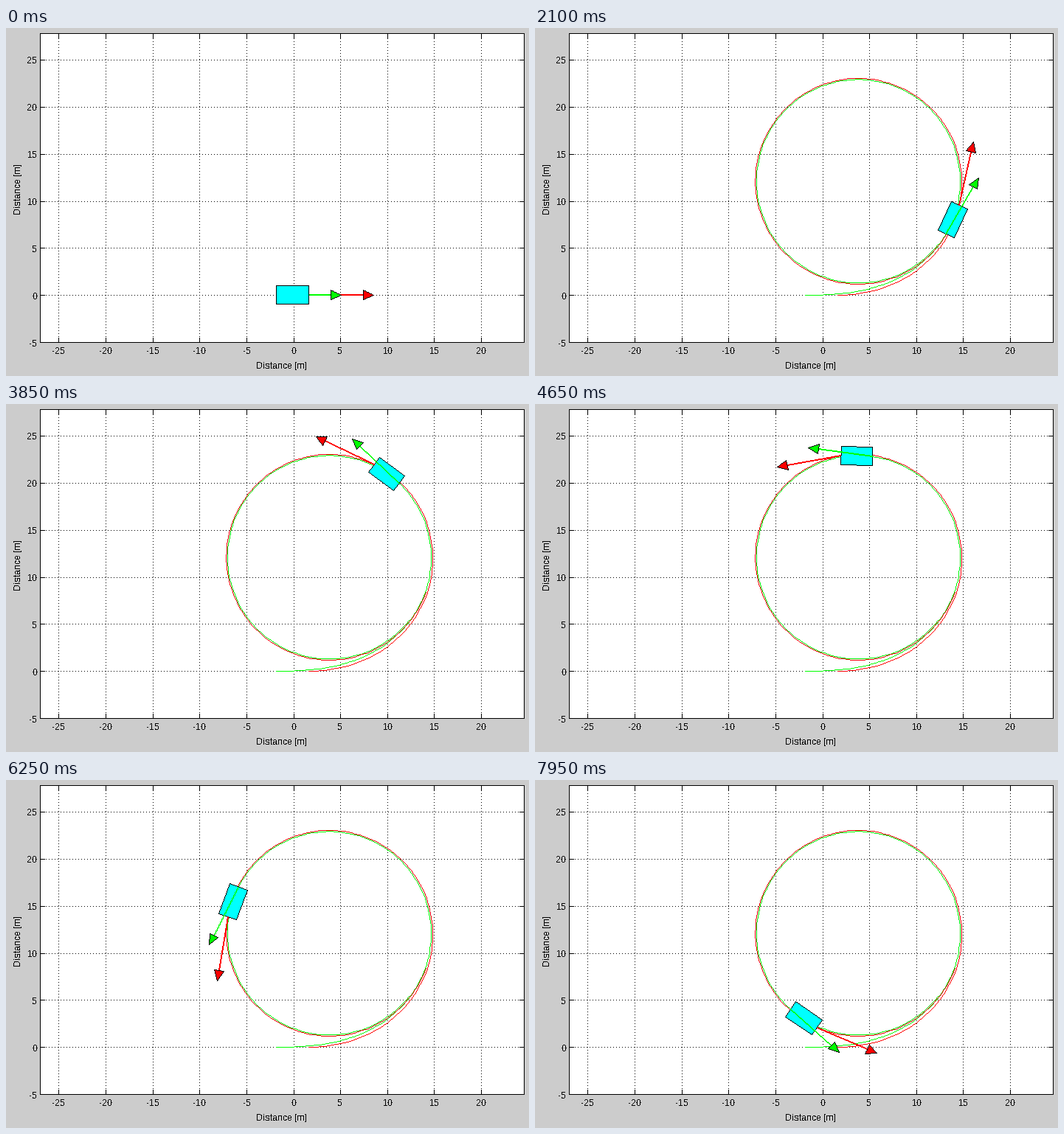
A matplotlib script for the animation above (8 s loop, 709x472 px).

```python
import numpy as np
import matplotlib.pyplot as plt
from matplotlib.animation import FuncAnimation
from matplotlib.patches import PathPatch, Polygon, Rectangle
from matplotlib.path import Path

W, H, DPI = 709, 472, 100
PX = 72 / DPI                       # one pixel in points
FRAMES, STEP_MS = 160, 50
TRAIL_STEPS = 200

LEFT, RIGHT, TOP, BOTTOM = 46, 702, 7, 426
CENTRE = np.array([437.8, 207.4])   # centre of the steady turn
HALF_WIDTH = 12.5
ARROW, HEAD, HEAD_HALF = 88, 14, 6.5
GREEN, RED, CYAN = "#00ff00", "#ff0000", "#00ffff"
SQUARE = np.array([[-1, -1], [1, -1], [1, 1], [-1, 1], [-1, -1]]) / 2
SQUARE_CODES = [Path.MOVETO] + [Path.LINETO] * 3 + [Path.CLOSEPOLY]

plt.rcParams.update({
    "font.family": "Liberation Sans",
    "font.size": 12 * PX,
    "text.antialiased": False,
    "text.hinting": "native",
    "text.hinting_factor": 1,
})

# Data coordinates are pixel indices: whole numbers are pixel centres.
fig = plt.figure(figsize=(W / DPI, H / DPI), dpi=DPI, facecolor="#cccccc")
ax = fig.add_axes([0, 0, 1, 1])
ax.set_xlim(-0.5, W - 0.5)
ax.set_ylim(H - 0.5, -0.5)
ax.axis("off")


def raster(points):
    """Pixels of a hard-edged, one pixel wide line through the points."""
    parts = []
    for p, q in zip(points[:-1], points[1:]):
        a, b = np.rint(p), np.rint(q)
        n = int(max(abs(b - a))) + 1
        parts.append(np.rint(np.linspace(a, b, n)))
    return np.concatenate(parts)


def pixel_path(pixels):
    verts = (pixels[:, None, :] + SQUARE).reshape(-1, 2)
    return Path(verts, SQUARE_CODES * len(pixels))


class Stroke:
    def __init__(self, color, z, pixels=np.zeros((1, 2))):
        self.patch = PathPatch(pixel_path(pixels), fc=color, ec="none",
                               lw=0, zorder=z, snap=False)
        ax.add_patch(self.patch)

    def set(self, pixels):
        self.patch.set_path(pixel_path(pixels))


class Shape:
    """Filled polygon with a thin black outline."""

    def __init__(self, color, z):
        self.fill = Polygon(np.zeros((3, 2)), fc=color, ec="none", lw=0,
                            zorder=z, snap=False)
        ax.add_patch(self.fill)
        self.edge = Stroke("black", z + 0.1)

    def set(self, corners):
        self.fill.set_xy(corners)
        self.edge.set(raster([*corners, corners[0]]))

    def set_zorder(self, z):
        self.fill.set_zorder(z)
        self.edge.patch.set_zorder(z + 0.1)


def rule(x0, y0, x1, y1, every=1, z=2):
    pixels = raster([np.array([x0, y0]), np.array([x1, y1])])
    Stroke("black", z, pixels[::every])


def x_pixel(v):
    return round(389.55 + 12.727 * v)


def y_pixel(v):
    return round(362.2 - 12.767 * v)


def draw_axes():
    ax.add_patch(Rectangle((LEFT, TOP), RIGHT - LEFT, BOTTOM - TOP,
                           fc="white", ec="none", lw=0, zorder=0, snap=False))
    for x in (LEFT, RIGHT):
        rule(x, TOP, x, BOTTOM)
    for y in (TOP, BOTTOM):
        rule(LEFT, y, RIGHT, y)
    for v in range(-25, 21, 5):
        x = x_pixel(v)
        rule(x, BOTTOM, x, TOP, every=4, z=1)
        rule(x, BOTTOM, x, BOTTOM - 6)
        rule(x, TOP, x, TOP + 6)
        ax.text(x, 442, str(v), ha="center", va="baseline")
    for v in range(-5, 26, 5):
        y = y_pixel(v)
        if v > -5:
            rule(LEFT, y, RIGHT, y, every=4, z=1)
        rule(LEFT, y, LEFT + 6, y)
        rule(RIGHT, y, RIGHT - 6, y)
        ax.text(42, y + 5, str(v), ha="right", va="baseline")
    ax.text(373, 461, "Distance [m]", ha="center", va="baseline")
    ax.text(19, 218, "Distance [m]", ha="center", va="baseline",
            rotation=90, rotation_mode="anchor")


class Track:
    """Spiral that leaves `start` heading right and settles on a circle."""

    def __init__(self, start, radius, speed):
        dx, dy = start[0] - CENTRE[0], CENTRE[1] - start[1]
        r0, phi0 = np.hypot(dx, dy), np.arctan2(dy, dx)
        excess = r0 - radius
        decay = r0 * dx / dy / excess
        u = np.linspace(0, 4 * np.pi, 3000)
        r = radius + excess * np.exp(-decay * u)
        self.x = CENTRE[0] + r * np.cos(phi0 + u)
        self.y = CENTRE[1] - r * np.sin(phi0 + u)
        steps = np.hypot(np.diff(self.x), np.diff(self.y))
        self.s = np.concatenate([[0], np.cumsum(steps)])
        self.speed = speed

    def point(self, t):
        s = self.speed * t
        return np.array([np.interp(s, self.s, self.x),
                         np.interp(s, self.s, self.y)])

    def pose(self, t):
        p = self.point(t)
        d = self.point(t + 0.1) - p
        return p, d / np.hypot(*d)

    def trail(self):
        return raster([self.point(t) for t in range(TRAIL_STEPS + 1)])


class Arrow:
    def __init__(self, color, z):
        self.shaft = Stroke(color, z)
        self.head = Shape(color, z + 0.1)

    def place(self, p, d):
        tip = p + ARROW * d
        base = tip - HEAD * d
        side = HEAD_HALF * np.array([-d[1], d[0]])
        # Two pixels thick across the line's main direction.
        half = np.array([0, 0.5] if abs(d[0]) > abs(d[1]) else [0.5, 0])
        self.shaft.set(np.concatenate([raster([p + o, base + o])
                                       for o in (-half, half)]))
        self.head.set([tip, base + side, base - side])


draw_axes()
front = Track((410, 361.9), 139.4, 5.412)
rear = Track((366, 361.9), 138.0, 5.341)
trails = [Stroke(GREEN, 3, rear.trail()), Stroke(RED, 3.1, front.trail())]
body = Shape(CYAN, 4)
red_arrow = Arrow(RED, 5)
green_arrow = Arrow(GREEN, 6)


def draw(i):
    t = max(i - 1, 0)
    f, f_dir = front.pose(t)
    b, b_dir = rear.pose(t)
    along = (f - b) / np.hypot(*(f - b))
    side = HALF_WIDTH * np.array([-along[1], along[0]])
    body.set([b + side, f + side, f - side, b - side])
    body.set_zorder(4 if i else 7)
    red_arrow.place(f, f_dir)
    green_arrow.place(b, b_dir)
    for trail in trails:
        trail.patch.set_visible(i > 0)
    return [trail.patch for trail in trails]


anim = FuncAnimation(fig, draw, frames=FRAMES, interval=STEP_MS,
                     init_func=lambda: draw(0), repeat=True, repeat_delay=0)
plt.show()
```
